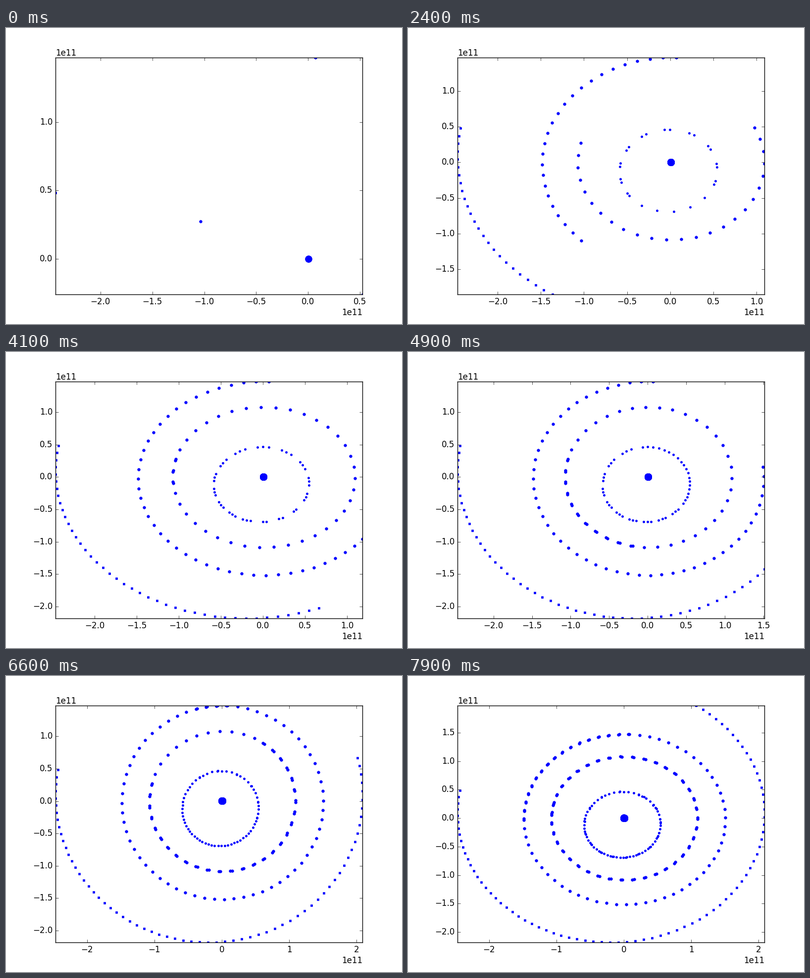
Animation, 800 px wide and 600 px high, one loop 8000 ms. Source, as a matplotlib script:

```python
import numpy as np
import matplotlib.pyplot as plt
from matplotlib.animation import FuncAnimation

plt.style.use("classic")
plt.rcParams.update({
    "figure.dpi": 100,
    "savefig.dpi": "figure",
    "figure.facecolor": "white",
    "font.family": "DejaVu Sans",
})

FRAMES = 80
STEP = 5e5            # simulated seconds per frame
SUBSTEP = 100.0       # integrator step, causes a slow outward drift
AU = 1.495979e11
GM = 1.3271244e20

t = np.arange(FRAMES) * STEP
star = np.array([5.5e8, 1e8]) + np.outer(t, [-4.0, 12.0])


def orbit(a, e, lon, peri, tilt=0.0, node=48.3):
    """Kepler path: axis in AU, angles in degrees, lon is the start."""
    lon, peri, tilt, node = np.radians([lon, peri, tilt, node])
    a *= AU
    n = np.sqrt(GM / a**3)
    mean = lon - peri + n * t - 1.5 * SUBSTEP * n**3 * t**2
    a = a * (1 + 2 * SUBSTEP * n**2 * t)
    ecc = mean
    for _ in range(30):
        ecc = mean + e * np.sin(ecc)
    flat = a * (np.cos(ecc) - e + 1j * np.sqrt(1 - e * e) * np.sin(ecc))
    # foreshorten across the line of nodes
    flat = flat * np.exp(1j * (peri - node))
    z = (flat.real + 1j * np.cos(tilt) * flat.imag) * np.exp(1j * node)
    return np.column_stack([z.real, z.imag]) + star


fig, ax = plt.subplots(figsize=(8, 6))
bodies = []


def add_body(track, size, marker="o"):
    line, = ax.plot([], [], linestyle="", marker=marker, markersize=size,
                    color="b", markeredgecolor="b", markeredgewidth=0.5)
    bodies.append((line, track))


add_body(star, 10)
add_body(orbit(0.3871, 0.2056, 356.76, 77.48, tilt=7), 3)
add_body(orbit(0.72334, 0.0068, 164.82, 131.6), 4)
add_body(orbit(0.99972, 0.01658, 88.09, 104.53), 4)
add_body(orbit(1.52371, 0.0934, 171.35, -23.87), 2.88, "s")

# view limits follow everything plotted so far
points = np.array([track for _, track in bodies])
low = np.minimum.accumulate(points.min(axis=0))
high = np.maximum.accumulate(points.max(axis=0))


def update(k):
    for line, track in bodies:
        line.set_data(*track[:k + 1].T)
    ax.set_xlim(low[k, 0], high[k, 0])
    ax.set_ylim(low[k, 1], high[k, 1])
    return [line for line, _ in bodies]


anim = FuncAnimation(fig, update, frames=FRAMES, interval=100,
                     repeat=True, repeat_delay=0, blit=False)
plt.show()
```
